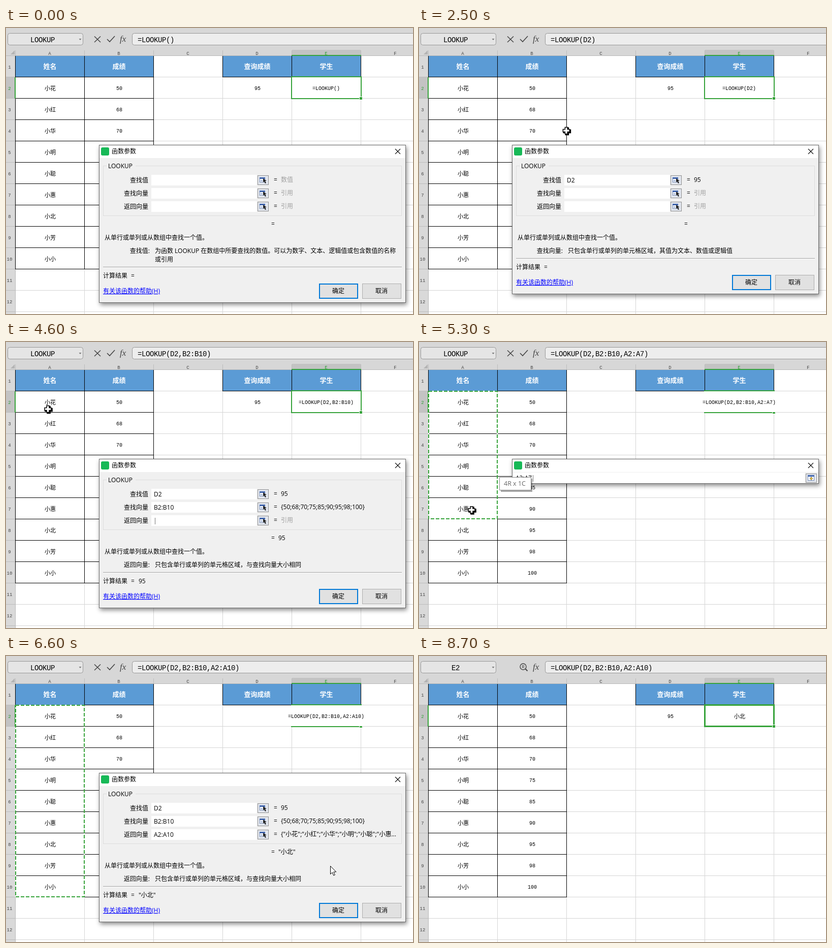
These frames come from a looping animation (801 px wide and 563 px high, 9 s). An HTML page:

```html
<!DOCTYPE html>
<html lang="zh-CN">
<head>
<meta charset="utf-8">
<title>LOOKUP</title>
<style>
  html, body { margin: 0; width: 100%; height: 100%; overflow: hidden; background: #fff; }
  svg { display: block; width: 801px; height: 563px; }
  text { white-space: pre; fill: #000; }
  .cell { font: 10px "Liberation Mono", "Noto Sans CJK SC", "Noto Sans CJK", monospace; }
  .name { font: 11px "Noto Sans CJK SC", "Noto Sans CJK", sans-serif; }
  .bar { font: 14px "Liberation Mono", monospace; letter-spacing: -.4px; }
  .head { font: bold 13px "Noto Sans CJK SC", "Noto Sans CJK", sans-serif; fill: #fff; }
  .ui { font: 12px "Open Sans", "Noto Sans CJK SC", "Noto Sans CJK", sans-serif; }
  .label { font: 9px "Liberation Mono", monospace; fill: #444; }
  .fx { font: italic 17px "Liberation Serif", serif; fill: #444; }
  .mid { text-anchor: middle; }
  .end { text-anchor: end; }
  .gray { fill: #a0a0a0; }
  .green { fill: #2f9e36; }
  .link { fill: #00f; text-decoration: underline; }
  .tip { font: 12.5px "Open Sans", sans-serif; fill: #666; }
  .panel { filter: drop-shadow(2px 4px 4px rgba(0, 0, 0, .45)); }
</style>
</head>
<body>
<svg viewBox="0 0 801 563"><g id="sheet"></g><g id="live"></g></svg>
<script>
const LOOP = 9000, STEP = 100, GREEN = '#37a33b';
const students = ['小花', '小红', '小华', '小明', '小聪', '小惠', '小北', '小芳', '小小'];
const scores = [50, 68, 70, 75, 85, 90, 95, 98, 100];
const fields = ['查找值', '查找向量', '返回向量'];
const help = [
  ['为函数 LOOKUP 在数组中所要查找的数值。可以为数字、文本、逻辑值或包含数值的名称', '或引用'],
  ['只包含单行或单列的单元格区域，其值为文本、数值或逻辑值'],
  ['只包含单行或单列的单元格区域，与查找向量大小相同']
];

// Pointer waypoints: time, x, y
const route = [
  [200, 420, 299], [600, 455, 262], [1100, 510, 136.5], [1500, 510, 136.5],
  [2000, 390, 326], [2200, 390, 326], [2700, 224, 120], [3300, 235, 410.5],
  [3500, 235, 455], [3700, 235, 457], [4200, 360, 352], [4600, 83, 132.5], [4800, 84, 132],
  [5300, 104, 331], [5600, 106, 455], [5800, 106, 455], [6600, 638, 413], [6700, 638, 413],
  [7100, 654, 501], [7200, 654, 501], [7700, 648, 178],
  [8000, 556, 150], [8300, 640, 122], [8600, 790, 60]
];
const START = 200, END = 8700;

const colX = c => 18 + 136 * c;
const rowY = r => 54 + 42 * r;
const within = (t, a, b) => t >= a && t < b;

const rect = (x, y, w, h, fill, extra = '') =>
  `<rect x="${x}" y="${y}" width="${w}" height="${h}" fill="${fill}" ${extra}/>`;
const frame = (x, y, w, h, stroke, fill = 'none', extra = '') =>
  rect(x + .5, y + .5, w - 1, h - 1, fill, `stroke="${stroke}" ${extra}`);
const text = (x, y, s, cls) => `<text x="${x}" y="${y}" class="${cls}">${s}</text>`;
const path = (d, stroke, width = 1, fill = 'none') =>
  `<path d="${d}" stroke="${stroke}" stroke-width="${width}" fill="${fill}"/>`;
const hline = (x, y, w, c) => rect(x, y, w, 1, c);
const vline = (x, y, h, c) => rect(x, y, 1, h, c);

function drawSheet() {
  let s = rect(0, 0, 801, 563, '#fff') + rect(0, 0, 801, 54, '#d7d7d7') + rect(0, 54, 18, 509, '#d9d9d9');
  s += frame(3, 10, 149, 24, '#989898', '#e5e5e5', 'rx="4"') + path('M143.5 21h5l-2.5 3z', 'none', 0, '#777');
  s += frame(248, 10, 570, 24, '#989898', '#ededed', 'rx="4"') + text(224, 27, 'fx', 'fx');
  s += rect(563, 43, 135, 10, '#c3c3c3') + rect(0, 97, 18, 41, '#c3c3c3');
  s += path('M17 44v8h-8z', 'none', 0, '#b4b4b4');
  for (let c = 0; c < 6; c++) {
    s += vline(colX(c), 44, 10, '#bcbcbc') + vline(colX(c + 1), 54, 509, '#d5d5d5');
    s += text(colX(c) + 68, 53, 'ABCDEF'[c], 'label mid' + (c === 4 ? ' green' : ''));
  }
  s += hline(0, 54, 801, '#b9b9b9') + vline(18, 54, 509, '#b9b9b9');
  for (let r = 1; r <= 12; r++) {
    s += hline(0, rowY(r), 18, '#bcbcbc') + hline(19, rowY(r), 782, '#d5d5d5');
    s += text(7, rowY(r) - 16, r, 'label mid' + (r === 2 ? ' green' : ''));
  }
  s += rect(19, 55, 272, 41, '#5b9bd5') + rect(427, 55, 272, 41, '#5b9bd5');
  ['姓名', '成绩', , '查询成绩', '学生'].forEach((h, c) => s += text(colX(c) + 68.5, 80, h, 'head mid'));
  for (let r = 1; r <= 10; r++) s += hline(18, rowY(r), 273, '#000');
  for (let c = 0; c < 3; c++) s += vline(colX(c), 55, 420, '#000');
  for (let c = 3; c < 6; c++) s += vline(colX(c), 55, 42, '#000');
  s += hline(426, 96, 273, '#000');
  students.forEach((n, i) => {
    s += text(87, rowY(i + 2) - 15, n, 'name mid') + text(223, rowY(i + 2) - 16, scores[i], 'cell mid');
  });
  s += text(495, 122, '95', 'cell mid');
  return s + rect(562, 53, 137, 2, GREEN) + rect(17, 97, 2, 42, GREEN);
}

function pointer(t) {
  let i = route.findIndex(p => p[0] > t);
  if (i < 0) i = route.length;
  const a = route[Math.max(0, i - 1)], b = route[Math.min(i, route.length - 1)];
  const k = b[0] > a[0] ? (t - a[0]) / (b[0] - a[0]) : 0;
  return [a[1] + (b[1] - a[1]) * k, a[2] + (b[2] - a[2]) * k];
}
const rowAt = t => Math.max(2, Math.min(10, Math.floor((pointer(t)[1] - 54) / 42) + 1));
const range = (col, row) => row === 2 ? col + 2 : `${col}2:${col}${row}`;

function stateAt(t) {
  const rowB = rowAt(Math.min(t, 3600)), rowA = rowAt(Math.min(t, 5700));
  const vals = [t < 1200 ? '' : 'D2', t < 2700 ? '' : range('B', rowB), t < 4800 ? '' : range('A', rowA)];
  return {
    vals, rowA, rowB,
    focus: t < 2000 ? 0 : t < 4200 ? 1 : 2,
    mini: within(t, 1200, 1300) || within(t, 2700, 3800) || within(t, 4800, 5900),
    done: t >= 7200,
    formula: `=LOOKUP(${vals.filter(Boolean).join(',')})`,
    result: t < 3800 ? '' : t < 5900 ? '95' : '"小北"',
    caret: (t - [200, 1300, 2000, 4200, 5900].filter(s => s <= t).pop()) % 1000 < 500
  };
}

function ants(c, r1, r2) {
  const x = colX(c) + 1, y = rowY(r1 - 1) + 1, h = rowY(r2) - y, d = `M${x} ${y}h135v${h}h-135z`;
  return path(d, '#fff', 2) + `<path d="${d}" fill="none" stroke="${GREEN}" stroke-width="2" stroke-dasharray="7 3"/>`;
}

function tip(t, st) {
  let col, row, gap;
  if (within(t, 2700, 3800)) [col, row, gap] = [1, st.rowB, 4];
  else if (within(t, 4800, 5900)) [col, row, gap] = [0, t < 5500 ? rowAt(t - 200) : st.rowA, 2];
  if (!row || row < 3) return '';
  const x = colX(col + 1) + 4, y = rowY(row) + gap;
  return rect(x + 3, y + 3, 62, 26, '#000', 'opacity=".35"') + frame(x, y, 63, 26, '#8c8c8c', '#fff') +
    text(x + 9, y + 17, `${row - 1}R x 1C`, 'tip');
}

function picker(y) {
  return frame(495, y, 22, 19, '#8f8f8f', '#e2e6ee') + frame(499, y + 4, 11, 10, '#7088b0', '#fff') +
    rect(499, y + 4, 11, 3, '#3f64ad') + rect(501, y + 9, 4, 3, '#b4c4e2') +
    path(`M506 ${y + 6}v8l2-2 2 4 2-1-2-4h3z`, 'none', 0, '#222');
}

function button(x, y, label, main) {
  return (main ? rect(x + 1, y + 1, 75, 28, '#e1e1e1', 'stroke="#0078d7" stroke-width="2"')
    : frame(x, y, 77, 30, '#adadad', '#e1e1e1')) + text(x + 38, y + 19, label, 'ui mid');
}

const typed = (x, y, s, caret) => `<text x="${x}" y="${y}" class="ui">${s}` +
  (caret ? '<tspan dx="-1" font-weight="300">|</tspan>' : '') + '</text>';

function dialog(st) {
  const tall = st.focus === 0, dy = tall ? 0 : -17, h = st.mini ? 49 : 311 + dy;
  let s = `<g class="panel">${frame(183, 230, 604, h, '#686868', '#f0f0f0')}</g>` +
    rect(184, 231, 602, 25, '#fff') + rect(187, 235, 16, 16, '#17b957', 'rx="3"') +
    text(208, 247, '函数参数', 'ui') + path('M766 238l10 10M776 238l-10 10', '#111', 1.2);
  if (st.mini) {
    return s + rect(184, 257, 576, 21, '#fff') + typed(190, 272, st.vals[st.focus], true) +
      frame(761, 259, 22, 18, '#8f8f8f', '#e2e6ee') + frame(765, 262, 13, 11, '#7088b0', '#fff') +
      rect(765, 262, 13, 3, '#3f64ad') + path('M771 266h2v2h2l-3 4-3-4h2z', '#555', .6, '#f5c52c');
  }
  s += frame(191, 271, 588, 99, '#dcdcdc') + rect(198, 270, 57, 4, '#f0f0f0') + text(201, 276, 'LOOKUP', 'ui');
  const shown = ['95', `{${scores.join(';')}}`, `{${students.slice(0, 6).map(n => `"${n}`).join('";')}...`];
  fields.forEach((f, i) => {
    const y = 289 + 26 * i, v = st.vals[i];
    s += text(280, y + 15, f, 'ui end') + rect(286, y, 208, 21, '#fff') + picker(y + 1);
    s += typed(291, y + 15, v, st.caret && i === st.focus);
    s += text(527, y + 14, '=', 'ui') + text(541, y + 14, v ? shown[i] : i ? '引用' : '数值', 'ui' + (v ? '' : ' gray'));
  });
  s += text(522, 390, '=', 'ui') + text(536, 390, st.result, 'ui');
  s += text(194, 417, '从单行或单列或从数组中查找一个值。', 'ui') + text(283, 443, fields[st.focus] + ':', 'ui end');
  help[st.focus].forEach((line, i) => s += text(293, 443 + 17 * i, line, 'ui'));
  s += hline(191, 470 + dy, 588, '#a0a0a0') + hline(191, 471 + dy, 588, '#fff');
  s += text(191, 492 + dy, '计算结果', 'ui') + text(246, 492 + dy, '=', 'ui') + text(261, 492 + dy, st.result, 'ui');
  s += text(191, 522 + dy, '有关该函数的帮助(H)', 'ui link');
  return s + button(616, 503 + dy, '确定', true) + button(701, 503 + dy, '取消');
}

function cursor(t, st) {
  if (!within(t, START, END)) return '';
  const [x, y] = pointer(t), bottom = st.mini ? 279 : st.focus ? 524 : 541;
  const onDialog = !st.done && within(x, 184, 786) && within(y, 231, bottom);
  const onInput = onDialog && !st.mini && within(x, 286, 494) && fields.some((_, i) => within(y, 289 + 26 * i, 310 + 26 * i));
  const shape = onInput ? path('M-3-8h2l1 1 1-1h2M0-7v14M-3 8h2l1-1 1 1h2', '#000')
    : onDialog ? path('M.5.5v16l3.7-3.5 2.6 6 2.6-1.1-2.6-5.9h5z', '#000', 1, '#fff')
    : path('M-2-6h6v4h4v6h-4v4h-6v-4h-4v-6h4z', '#000', 1.6, '#000') +
      path('M-3-7h5v4h4v5h-4v4h-5v-4h-4v-5h4z', '#000', 1.5, '#fff');
  return `<g transform="translate(${x.toFixed(1)} ${y.toFixed(1)})">${shape}</g>`;
}

function render(t) {
  const st = stateAt(t);
  let s = text(72, 28, st.done ? 'E2' : 'LOOKUP', 'bar mid') + text(259, 28, st.formula, 'bar');
  if (st.done) {
    s += '<circle cx="205" cy="21" r="6" fill="none" stroke="#444" stroke-width="1.4"/>' +
      path('M209.5 25.5l4 4', '#444', 2) + text(205, 24, 'R', 'label mid');
    s += rect(562.5, 96.5, 136, 42, 'none', `stroke="${GREEN}" stroke-width="3"`);
  } else {
    s += path('M174 16.5l12 11.5M186 16.5l-12 11.5', '#444', 1.5) + path('M199 22l5 5 10-11', '#444', 1.6);
    s += rect(562, 96, 137, 43, 'none', `stroke="${GREEN}" stroke-width="2"`);
  }
  s += rect(695, 135, 7, 7, '#fff') + rect(696, 136, 5, 5, GREEN);
  if (st.done) s += text(631, 123, '小北', 'name mid');
  else {
    if (st.formula.length * 6 > 134) s += rect(427, 97, 374, 41, '#fff');
    s += text(630, 121.5, st.formula, 'cell mid');
  }
  if (within(t, 1200, 2000)) s += ants(3, 2, 2);
  if (within(t, 2700, 4200)) s += ants(1, 2, st.rowB);
  if (within(t, 4800, 7200)) s += ants(0, 2, st.rowA);
  if (!st.done) s += dialog(st);
  return s + tip(t, st) + cursor(t, st);
}

const live = document.getElementById('live');
document.getElementById('sheet').innerHTML = drawSheet();
const began = performance.now();
let last = -1;
function tick() {
  const t = Math.floor((performance.now() - began) % LOOP / STEP) * STEP;
  if (t !== last) live.innerHTML = render(last = t);
  requestAnimationFrame(tick);
}
tick();
</script>
</body>
</html>
```
